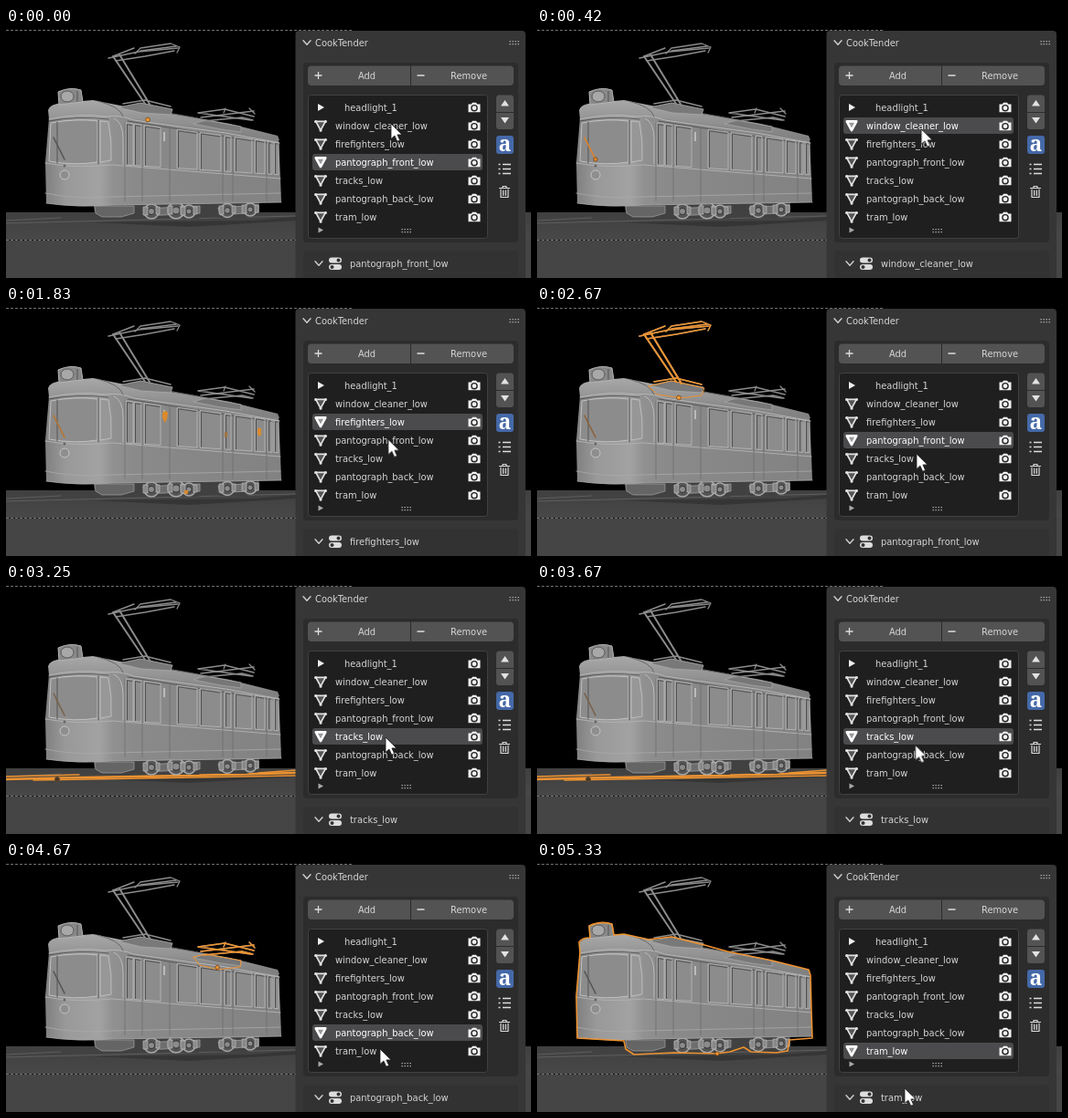
These frames come from a looping animation (574x274 px, 5410 ms). An HTML page:

```html
<!DOCTYPE html>
<html lang="en">
<head>
<meta charset="utf-8">
<title>Bake list</title>
<style>
html, body { margin: 0; width: 100%; height: 100%; overflow: hidden; background: #000; }
svg { display: block; width: 574px; height: 274px; }
text { font: 9.9px "DejaVu Sans", sans-serif; fill: #d6d6d6; }
.sel text { fill: #fff; }
.line { fill: none; stroke-linejoin: round; stroke-linecap: round; }
.grey { color: #8b8b8b; }
.hot { color: #ed9230; }

/* Hard switches: one selected item at a time */
.pick, .wiper, .cursor { animation: 5410ms step-end infinite; }
.pick { opacity: 0; }
.cleaner { animation-name: cleaner; }
.fire { animation-name: fire; }
.front { animation-name: front; }
.frontHot { animation-name: frontHot; }
.tracks { animation-name: tracks; }
.back { animation-name: back; }
.tram { animation-name: tram; }
.wiper { animation-name: wiper; }
.cursor { animation-name: cursor; animation-timing-function: linear; }
@keyframes cleaner { 0% { opacity: 0 } 6.1% { opacity: 1 } 19.9% { opacity: 0 } }
@keyframes fire { 0% { opacity: 0 } 19.9% { opacity: 1 } 35.3% { opacity: 0 } }
@keyframes front { 0% { opacity: 1 } 6.1% { opacity: 0 } 35.3% { opacity: 1 } 55.3% { opacity: 0 } }
@keyframes frontHot { 0% { opacity: 0 } 35.3% { opacity: 1 } 55.3% { opacity: 0 } }
@keyframes tracks { 0% { opacity: 0 } 55.3% { opacity: 1 } 72.2% { opacity: 0 } }
@keyframes back { 0% { opacity: 0 } 72.2% { opacity: 1 } 87.6% { opacity: 0 } }
@keyframes tram { 0% { opacity: 0 } 87.6%, 100% { opacity: 1 } }
@keyframes wiper {
  0% { stroke: #565656 } 6.1% { stroke: #e08229 } 19.9% { stroke: #b8742f }
  35.3% { stroke: #8c643c } 55.3% { stroke: #7a6148 } 72.2%, 100% { stroke: #565656 }
}
@keyframes cursor {
  0%, 4% { transform: translate(421px, 105px) }
  17%, 27% { transform: translate(418px, 125px) }
  33% { transform: translate(418px, 146px) }
  44%, 47.7% { transform: translate(417px, 150px) }
  49.2% { transform: translate(415px, 162px) }
  60%, 65% { transform: translate(415px, 168px) }
  71% { transform: translate(412px, 186px) }
  80% { transform: translate(409px, 201px) }
  88% { transform: translate(409px, 206px) }
  98.5%, 100% { transform: translate(402px, 248px) }
}
</style>
</head>
<body>
<svg viewBox="0 0 574 274">
  <defs>
    <linearGradient id="faceFill">
      <stop offset="0" stop-color="#808080"/><stop offset=".3" stop-color="#999"/>
      <stop offset=".8" stop-color="#a2a2a2"/><stop offset="1" stop-color="#919191"/>
    </linearGradient>
    <linearGradient id="sideFill">
      <stop offset="0" stop-color="#929292"/><stop offset=".15" stop-color="#8a8a8a"/>
      <stop offset="1" stop-color="#828282"/>
    </linearGradient>
    <linearGradient id="roofFill" x2="0" y2="1">
      <stop offset="0" stop-color="#a8a8a8"/><stop offset="1" stop-color="#7e7e7e"/>
    </linearGradient>
    <linearGradient id="ground" x2="0" y2="1">
      <stop offset="0" stop-color="#404040"/><stop offset="1" stop-color="#484848"/>
    </linearGradient>
    <g id="frontArm" class="line" stroke="currentColor">
      <path d="M117 31L152 83M124 29L158 85" stroke-width="2"/>
      <path d="M112 33L145 26L188 22M117 31L140 22M120 36L152 31L184 25" stroke-width="1.5"/>
      <path d="M141 28L147 22L180 17L190 21L187 27M147 25L186 20" stroke-width="1.3"/>
      <path d="M128 83L152 79L180 86" stroke-width="1.5"/>
    </g>
    <g id="backArm" class="line" stroke="currentColor">
      <path d="M210 93L268 101M213 98L271 91M210 93L239 89L271 97" stroke-width="1.6"/>
      <path d="M216 102L258 98L270 101M240 88L238 93M266 88L272 94" stroke-width="1.3"/>
    </g>
    <g id="meshIcon">
      <path d="M-5.3 -4.6H5.3L0 5.2Z" fill="#555" stroke="#e2e2e2" stroke-width="1.7" stroke-linejoin="round"/>
      <path d="M-5.5 -4.6h.1M5.4 -4.6h.1M0 5.2h.1" stroke="#e2e2e2" stroke-width="3" stroke-linecap="round"/>
    </g>
    <path id="meshIconOn" d="M-5.3 -4.6H5.3L0 5.2Z" fill="#999" stroke="#fff" stroke-width="2.6" stroke-linejoin="round"/>
    <g id="camera">
      <path d="M-6.5 -3.5H-3.2L-2 -5.3H2L3.2 -3.5H6.5V5.3H-6.5Z" fill="#f2f2f2"/>
      <circle cy=".7" r="3.1" fill="#f2f2f2" stroke="#222" stroke-width="1.4"/>
    </g>
    <g id="grip" fill="#b4b4b4"></g>
    <path id="chevron" class="line" d="M-4 -2.2L0 2.2L4 -2.2" stroke="#d0d0d0" stroke-width="1.4"/>
  </defs>

  <!-- Viewport -->
  <path d="M0 202H574V232H0Z" fill="url(#ground)"/>
  <path d="M0 232H574V274H0Z" fill="#454545"/>
  <path d="M0 214L317 206M0 211L60 208" class="line" stroke="#5e5e5e"/>
  <path d="M95 213L270 211L317 207V211L200 218Z" fill="#353535"/>
  <g class="line pick tracks" stroke="#ed9230">
    <path d="M0 214L60 212.5L200 210L317 207" stroke-width="2.6"/>
    <path d="M0 211L80 209M30 215L150 213L317 210M276 207L317 204" stroke-width="1.5"/>
    <circle cx="56" cy="214" r="2.5" fill="#44372a" stroke="#6b4a25"/>
  </g>

  <!-- Running gear -->
  <path d="M95 190H277V205L262 208H234L222 203L210 209H106L97 204Z" fill="#414141"/>
  <path d="M97 195H140V203L126 207H105L98 203Z" fill="#656565" stroke="#999" stroke-width=".8"/>
  <g id="gear"></g>

  <!-- Body -->
  <path d="M112 94Q121 91 135 94L298 121L300 164L301 191L180 193L114 194Z" fill="url(#sideFill)"/>
  <path d="M47 99Q80 90 113 96Q117 105 117 145L116 194Q75 197 44 192L43 147Z" fill="url(#faceFill)"/>
  <path d="M47 100L46 90Q48 83 62 82L95 79L130 86L200 97L245 105L297 118L299 123L240 113L135 99Q120 95 105 97Q72 95 47 100Z" fill="url(#roofFill)"/>
  <path d="M47 100Q78 93 110 97Q124 95 140 101L240 115L299 126" class="line" stroke="#b8b8b8"/>
  <path d="M47 102Q78 96 112 100M133 102L298 128" class="line" stroke="#4a4a4a" stroke-width=".8"/>
  <path d="M100 80Q125 86 128 97M150 88L210 99" class="line" stroke="#666"/>
  <path d="M43 148Q75 154 116 150L300 165" class="line" stroke="#b0b0b0"/>
  <path d="M43 181Q75 188 116 185L300 181M44 192Q78 197 116 194L301 191" class="line" stroke="#aaa" stroke-width=".8"/>

  <path d="M49 104Q76 99 100 102V147Q75 151 47 146Z" fill="#8c8c8c" stroke="#c0c0c0"/>
  <path d="M103 102L112 103Q116 123 115 145L103 147Z" fill="#979797" stroke="#bdbdbd"/>
  <path d="M56 103V148M101 101V149" class="line" stroke="#555"/>
  <path d="M118 99Q128 103 128 122V149" class="line" stroke="#bababa"/>
  <circle cx="64" cy="161" r="5" fill="#8e8e8e" stroke="#c4c4c4"/>
  <circle cx="64" cy="151" r="1.5" fill="#666"/>
  <path class="line wiper" d="M52 120L64 144" stroke-width="1.6"/>
  <path d="M57 70Q70 64 82 68L84 81L58 84Z" fill="#888" stroke="#b4b4b4"/>
  <ellipse cx="67" cy="75" rx="7" ry="6" fill="#a8a8a8" stroke="#5b5b5b"/>
  <path d="M78 69V81" stroke="#555"/>

  <g id="windows"></g>

  <!-- Roof gear -->
  <path d="M123 87L147 82L182 89L180 95L148 93Z" fill="#797979" stroke="#aaa" stroke-width=".8"/>
  <path d="M205 105L218 101L257 108V114L235 111Z" fill="#777" stroke="#a5a5a5" stroke-width=".8"/>
  <use href="#frontArm" class="grey"/>
  <use href="#backArm" class="grey"/>

  <!-- Selection outlines -->
  <circle class="pick cleaner" cx="64" cy="144" r="2.2" fill="#ee8a27" stroke="#5d3a17" stroke-width=".7"/>
  <g class="pick fire" fill="#dc8a2c">
    <path d="M171 117Q174 113 177 117L176 124L174 128L171 123Z"/>
    <path d="M275 134H279V141L277 143L275 140Z"/>
    <path d="M239 138H242V144H239Z" fill="#9d7444"/>
    <circle cx="197" cy="204" r="2.3"/>
  </g>
  <g class="pick frontHot hot">
    <use href="#frontArm" stroke-width="3"/>
    <path d="M122 88L147 82L183 90L180 98L158 101L132 97Z" class="line" stroke="currentColor"/>
  </g>
  <circle class="pick front" cx="155" cy="100.5" r="2.4" fill="#f39a32" stroke="#5d3a17" stroke-width=".7"/>
  <g class="pick back hot">
    <use href="#backArm"/>
    <path d="M205 104L218 101L257 108L256 115L232 118L212 113Z" class="line" stroke="currentColor"/>
    <circle cx="231" cy="115.5" r="2.2" fill="currentColor" stroke="#5d3a17" stroke-width=".7"/>
  </g>
  <g class="pick tram hot">
    <path class="line" stroke="currentColor" stroke-width="1.6" d="M47 99L46 88Q49 83 58 83L57 70Q70 64 82 68L84 80L95 79L122 85L147 82L183 91L208 98L257 108L297 118L299 124L300 164L301 193L276 195L274 207L262 209L234 208L226 203L211 208L196 210L150 209L106 211L97 205L95 196L44 193L43 147Z"/>
    <circle cx="197" cy="210" r="2.2" fill="currentColor" stroke="#5d3a17" stroke-width=".7"/>
  </g>
  <path d="M0 232.5H317" stroke="#111"/>
  <path d="M0 2.5H380M0 232.5H317" stroke="#707070" stroke-dasharray="3 2"/>

  <!-- Sidebar -->
  <rect x="316.5" y="3" width="251.500" height="280" rx="4" fill="#363636"/>
  <use href="#chevron" x="329" y="16"/>
  <text x="338" y="19.500">CookTender</text>
  <use href="#grip" x="556" y="16"/>
  <rect x="325" y="38" width="235" height="197" rx="4" fill="#2c2c2c"/>
  <path d="M334 41.500H442V63H334Q330 63 330 59V45.500Q330 41.500 334 41.500ZM443 41.500H551Q555 41.500 555 45.500V59Q555 63 551 63H443Z" fill="#535353"/>
  <path d="M337.500 52H345.500M341.500 48V56M449.500 52H457.500" stroke="#ddd" stroke-width="1.3"/>
  <text x="385" y="55.500">Add</text>
  <text x="486" y="55.500">Remove</text>

  <rect x="330.500" y="73.500" width="196" height="157" rx="3" fill="#1f1f1f" stroke="#414141"/>
  <path d="M341 83L348 87L341 91Z" fill="#eee"/>
  <text x="370" y="90.500">headlight_1</text>
  <use href="#camera" x="512" y="87"/>
  <g id="rows"></g>
  <path d="M341.500 218.500L347 221.500L341.500 224.500Z" fill="#aaa"/>
  <use href="#grip" x="438" y="222"/>

  <path d="M539 73.500H552Q555 73.500 555 77V92H536V77Q536 73.500 539 73.500ZM536 93H555V108Q555 111 552 111H539Q536 111 536 108Z" fill="#535353"/>
  <path d="M541 85.500L545.500 79L550 85.500ZM541 98L545.500 104.500L550 98Z" fill="#e2e2e2"/>
  <rect x="536" y="118" width="19" height="20" rx="3" fill="#4569a8"/>
  <text x="545.500" y="134.500" text-anchor="middle" style="font:bold 23px 'Noto Serif',serif;fill:#fff">a</text>
  <path d="M543 149.500H552M543 154.500H552M543 159.500H552M538.500 149.500H540.500M538.500 154.500H540.500M538.500 159.500H540.500" stroke="#ddd" stroke-width="1.5"/>
  <path d="M539.500 175.500H550.500M543 175V173.500H547V175M541 177V185.500H549V177M543.700 178V183.500M546.300 178V183.500" class="line" stroke="#ddd" stroke-width="1.2"/>

  <path d="M325 274V248Q325 244 329 244H556Q560 244 560 248V274Z" fill="#323232"/>
  <use href="#chevron" x="342" y="258"/>
  <rect x="353" y="251.500" width="14" height="6" rx="3" fill="#ddd"/>
  <rect x="353" y="259" width="14" height="6" rx="3" fill="#ddd"/>
  <circle cx="363.500" cy="254.500" r="2" fill="#333"/>
  <circle cx="356.500" cy="262" r="2" fill="#333"/>
  <g id="labels"></g>

  <path class="cursor" d="M0 0V16.500L3.900 13L6.700 19.200L9.600 17.900L6.900 11.900H12Z" fill="#fff" stroke="#222" stroke-width=".8"/>
</svg>
<script>
const put = (id, html) => { document.getElementById(id).innerHTML = html; };
const items = [
  ["cleaner", "window_cleaner_low"], ["fire", "firefighters_low"],
  ["front", "pantograph_front_low"], ["tracks", "tracks_low"],
  ["back", "pantograph_back_low"], ["tram", "tram_low"]
];

const row = (name, y, icon) =>
  `<use href="#${icon}" x="344" y="${y}"/><text x="360" y="${y + 3.5}">${name}</text>
   <use href="#camera" x="512" y="${y}"/>`;

put("rows", items.map(([key, name], i) => {
  const y = 107 + i * 20;
  return row(name, y, "meshIcon") + `<g class="sel pick ${key}">
    <rect x="335" y="${y - 9}" width="186" height="18" rx="3" fill="#4b4b4d"/>${row(name, y, "meshIconOn")}</g>`;
}).join(""));

put("labels", items.map(([key, name]) =>
  `<text class="pick ${key}" x="376" y="261.5">${name}</text>`).join(""));

put("grip", [0, 1, 2, 3, 4, 5, 6, 7].map(i =>
  `<rect x="${(i % 4) * 3 - 5.5}" y="${i < 4 ? -2 : 1}" width="1.3" height="1.3"/>`).join(""));

// Side panes follow the slope of the roof and the belt line
const paneTop = x => 104 + (x - 131) * .13;
const paneEnd = x => 150 + (x - 131) * .065;
const pane = (a, b) =>
  `<path d="M${a} ${paneTop(a)}L${b} ${paneTop(b)}V${paneEnd(b)}L${a} ${paneEnd(a)}Z"
    fill="#8c8c8c" stroke="#bcbcbc" stroke-width=".8"/>
   <path d="M${a + 1.5} ${paneEnd(a) - 1}V${paneTop(a) + 1.5}L${b - 1} ${paneTop(b) + 1.5}"
    class="line" stroke="#494949" stroke-width=".9"/>`;
const panes = [[131, 139], [140, 148], [151, 169], [187, 209], [212, 235],
  [239, 246], [250, 269], [272, 283], [286, 291], [293, 298]];
const seams = [130, 149, 179, 237, 248, 285];
put("windows", panes.map(([a, b]) => pane(a, b)).join("") +
  seams.map(x => `<path d="M${x} ${paneTop(x)}V190" stroke="#6b6b6b" stroke-width=".7"/>`).join("") +
  `<path d="M173 114V124" stroke="#bbb" stroke-width="2"/>`);

const wheel = (x, y, r) =>
  `<circle cx="${x}" cy="${y}" r="${r}" fill="#555" stroke="#a8a8a8" stroke-width="1.5"/>
   <circle cx="${x}" cy="${y}" r="${r * .45}" fill="#8b8b8b" stroke="#333"/>
   <path d="M${x - 9} ${y - 5}h5v9h-5zM${x + 5} ${y - 5}h4v8h-4z" fill="#888" stroke="#c4c4c4" stroke-width=".6"/>`;
const wheels = [[159, 201, 8], [186, 200, 9], [200, 201, 7], [242, 200, 7.5], [267, 199, 7]];
put("gear", `<path d="M150 198L212 195V203L152 206ZM232 197L276 194V202L234 205Z"
  fill="#6d6d6d" stroke="#aaa" stroke-width=".7"/>` + wheels.map(w => wheel(...w)).join(""));
</script>
</body>
</html>
```
